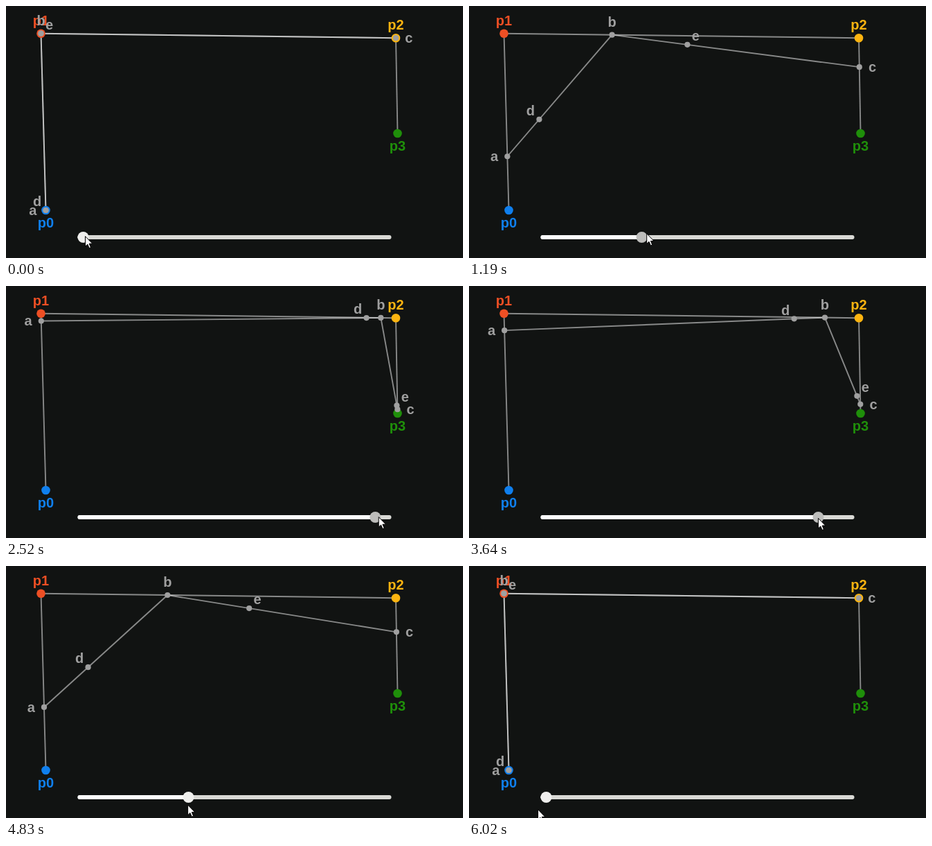
These frames come from a looping animation (660 by 364 pixels, 6090 ms). An HTML page:

```html
<!DOCTYPE html>
<html lang="en">
<head>
<meta charset="utf-8">
<title>Bezier construction</title>
<style>
  html, body { margin: 0; width: 100%; height: 100%; overflow: hidden; background: #111312; }
  svg { display: block; width: 660px; height: 364px; }
  text { font: bold 20px "Liberation Sans", Arial, sans-serif; text-anchor: middle; }
  line { stroke: #fff; stroke-opacity: .5; stroke-width: 1.9; }
</style>
</head>
<body>
<svg id="stage" viewBox="0 0 660 364"></svg>
<script>
const LOOP = 6090, STEP = 70;
const GRAY = '#a0a0a0';
const TRACK = { x: 103.5, y: 331, height: 6, rx: 3 };
const MIN_X = 111.5, RANGE = 438;   // thumb travel
const LAG = 25, LEAD = 23;          // points trail the thumb, the pointer runs ahead
const TURN = 3080;                  // the drag reverses here
const stage = document.getElementById('stage');

const control = [
  { name: 'p0', x: 57.5, y: 295, color: '#0f7fee', side: 1 },
  { name: 'p1', x: 50.5, y: 39.7, color: '#ee4f24', side: -1 },
  { name: 'p2', x: 563, y: 46.2, color: '#fcb410', side: -1 },
  { name: 'p3', x: 565.5, y: 184, color: '#1f8f0a', side: 1 }
];

const labelOffset = {
  a: [-18.7, 0], b: [0, -18.5], c: [18.7, 0], d: [-12.5, -12.5], e: [12, -12.5]
};

// Key points of the hand-made drag: [time, slider value], overshooting both ends
const drag = [[280, 0], [1190, .315], [1890, .671], [2520, .963], [2940, 1.014],
  [TURN, 1.014], [3640, .897], [4830, .347], [6020, -.034]];

// Monotone cubic interpolation through the key points
function dragAt(time) {
  const last = drag.length - 1;
  if (time <= drag[0][0]) return drag[0][1];
  if (time >= drag[last][0]) return drag[last][1];
  const i = drag.findIndex(key => key[0] > time) - 1;
  const slope = k => (drag[k + 1][1] - drag[k][1]) / (drag[k + 1][0] - drag[k][0]);
  const tangent = k => {
    if (k === 0 || k === last) return 0;
    const m = slope(k - 1), n = slope(k);
    return m * n > 0 ? 2 * m * n / (m + n) : 0;
  };
  const [t0, v0] = drag[i], [t1, v1] = drag[i + 1];
  const h = t1 - t0, u = (time - t0) / h, w = 1 - u;
  return v0 * (1 + 2 * u) * w * w + h * tangent(i) * u * w * w
    + v1 * u * u * (3 - 2 * u) - h * tangent(i + 1) * u * u * w;
}

// The pointer bows upward on the way out and sinks on the way back
function pointerAt(time) {
  const u = dragAt(time);
  const x = MIN_X + RANGE * dragAt(time + LEAD) + 3;
  const y = time < TURN ? 332 + u - 28 * u * (1 - u) ** 2 : 333 + 17.5 * (1 - u);
  return { x, y };
}

function set(node, attrs) {
  for (const key in attrs) node.setAttribute(key, attrs[key]);
  return node;
}

function add(tag, attrs, text) {
  const node = set(document.createElementNS('http://www.w3.org/2000/svg', tag), attrs);
  if (text) node.textContent = text;
  return stage.appendChild(node);
}

const clamp = v => Math.min(1, Math.max(0, v));
const mix = (p, q, t) => ({ x: p.x + (q.x - p.x) * t, y: p.y + (q.y - p.y) * t });
const ends = (p, q) => ({ x1: p.x, y1: p.y, x2: q.x, y2: q.y });
const labelAt = (p, dx, dy) => ({ x: p.x + dx, y: p.y + dy + 6.7 });

for (let i = 0; i < 3; i++) add('line', ends(control[i], control[i + 1]));
const lineAB = add('line', {}), lineBC = add('line', {});

for (const p of control) {
  add('circle', { cx: p.x, cy: p.y, r: 6.3, fill: p.color });
  add('text', { ...labelAt(p, 0, 18.5 * p.side), fill: p.color }, p.name);
}

const moving = Object.keys(labelOffset).map(name => ({
  name,
  dot: add('circle', { r: 4.1, fill: GRAY }),
  label: add('text', { fill: GRAY }, name)
}));

add('rect', { ...TRACK, width: 453, fill: '#d9d9d5' });
const filled = add('rect', { ...TRACK, fill: '#fff' });
const thumb = add('circle', { cy: 334, r: 8 });
const cursor = add('path', {
  d: 'M0 0V14.6L3.3 11.5L5.7 17L8 16L5.7 10.6H10.3Z',
  fill: '#fff', stroke: '#000'
});

function draw(time) {
  const t = clamp(dragAt(time - LAG));
  const [p0, p1, p2, p3] = control;
  const a = mix(p0, p1, t), b = mix(p1, p2, t), c = mix(p2, p3, t);
  const pos = { a, b, c, d: mix(a, b, t), e: mix(b, c, t) };
  set(lineAB, ends(a, b));
  set(lineBC, ends(b, c));
  for (const { name, dot, label } of moving) {
    const p = pos[name];
    set(dot, { cx: p.x, cy: p.y });
    set(label, labelAt(p, ...labelOffset[name]));
  }

  const knob = MIN_X + RANGE * clamp(dragAt(time));
  const { x, y } = pointerAt(time);
  const hover = time >= 140 && x < 557 && y < 342;
  set(filled, { width: knob - TRACK.x });
  set(thumb, { cx: knob, fill: hover ? '#bdbdbb' : '#efefed' });
  set(cursor, { transform: `translate(${x} ${y + .7})` });
}

const start = performance.now();
function tick() {
  const time = (performance.now() - start) % LOOP;
  draw(Math.floor(time / STEP) * STEP);
  requestAnimationFrame(tick);
}
tick();
</script>
</body>
</html>
```
